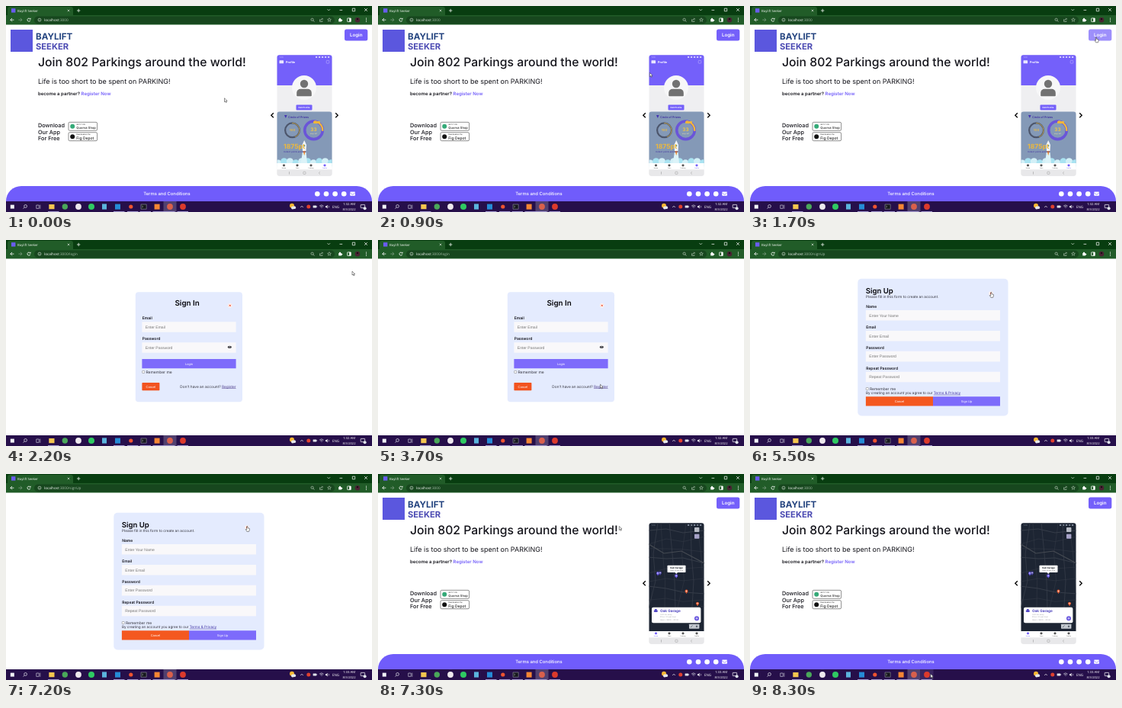
An HTML page with a canvas for the animation above (8400 ms loop, 480x270 px).

```html
<!DOCTYPE html>
<html lang="en">
<head>
<meta charset="utf-8">
<title>Baylift Seeker</title>
<style>
html, body { margin: 0; width: 100%; height: 100%; overflow: hidden; background: #fff; }
canvas { display: block; width: 480px; height: 270px; }
</style>
</head>
<body>
<canvas id="stage"></canvas>
<script>
const LOOP = 8400, STEP = 100;
const UI = 'Inter, sans-serif', CHROME = '"Open Sans", sans-serif', FIELD = '"Liberation Sans", Arial, sans-serif';
const PURPLE = '#7460fa', INK = '#15151c', ORANGE = '#f4581f';

const canvas = document.getElementById('stage');
const ratio = window.devicePixelRatio || 1;
canvas.width = 480 * ratio;
canvas.height = 270 * ratio;
const ctx = canvas.getContext('2d');
ctx.scale(ratio, ratio);
ctx.textRendering = 'geometricPrecision';

// ---------- drawing helpers ----------
function box(x, y, w, h, fill, r = 0, stroke = null, line = 0.6) {
  ctx.beginPath();
  ctx.roundRect(x, y, w, h, r);
  if (fill) { ctx.fillStyle = fill; ctx.fill(); }
  if (stroke) { ctx.strokeStyle = stroke; ctx.lineWidth = line; ctx.stroke(); }
}

function dot(x, y, r, fill) {
  ctx.beginPath();
  ctx.arc(x, y, r, 0, 7);
  ctx.fillStyle = fill;
  ctx.fill();
}

function arc(x, y, r, color, line, from = 0, to = Math.PI * 2) {
  ctx.beginPath();
  ctx.arc(x, y, r, from, to);
  ctx.strokeStyle = color;
  ctx.lineWidth = line;
  ctx.stroke();
}

function path(points, color, line = 0.8) {
  ctx.beginPath();
  points.forEach(([x, y]) => ctx.lineTo(x, y));
  ctx.strokeStyle = color;
  ctx.lineWidth = line;
  ctx.stroke();
}

function shape(points, fill) {
  ctx.beginPath();
  points.forEach(([x, y]) => ctx.lineTo(x, y));
  ctx.closePath();
  ctx.fillStyle = fill;
  ctx.fill();
}

// y is the middle of the capitals; returns the x where the text ends
function text(str, x, y, size, color = INK, { weight = 400, align = 'left', font = UI } = {}) {
  ctx.font = `${weight} ${size}px ${font}`;
  ctx.textAlign = align;
  ctx.fillStyle = color;
  ctx.fillText(str, x, y + size * 0.36);
  return x + ctx.measureText(str).width;
}

function link(str, x, y, size, color) {
  const end = text(str, x, y, size, color);
  box(x, y + size * 0.48, end - x, 0.5, color);
}

function cross(x, y, r, color, line) {
  path([[x - r, y - r], [x + r, y + r]], color, line);
  path([[x - r, y + r], [x + r, y - r]], color, line);
}

const clamp = v => Math.min(1, Math.max(0, v));
const ease = v => v * v * (3 - 2 * v);

// ---------- browser window ----------
function browser(route) {
  box(0, 0, 480, 12, '#083d10');
  box(2, 1, 86, 14, '#215c28', 3);
  box(0, 12, 480, 12.6, '#215c28');
  box(7, 3.2, 5.4, 5.4, '#6a5cf0');
  text('Baylift Seeker', 15, 6, 4.3, '#f2f6f2', { font: CHROME });
  cross(82, 6, 1.3, '#e8efe8', 0.6);
  path([[93, 6], [97.4, 6]], '#e8efe8', 0.8);
  path([[95.2, 3.8], [95.2, 8.2]], '#e8efe8', 0.8);

  path([[421.5, 4.2], [423.3, 6], [425.1, 4.2]], '#dfe8df', 0.7);
  path([[437.5, 5.4], [441.2, 5.4]], '#fff', 0.7);
  box(454.3, 3.2, 3.4, 3.6, null, 0, '#fff', 0.7);
  cross(472, 5, 1.9, '#fff', 0.7);

  box(37, 13.5, 394, 10, '#17471e', 5);
  path([[8, 16], [5.8, 18.2], [8, 20.4]], '#fff', 0.8);
  path([[5.8, 18.2], [10.4, 18.2]], '#fff', 0.8);
  path([[18.8, 16], [21, 18.2], [18.8, 20.4]], '#7e9d82', 0.8);
  path([[16.4, 18.2], [21, 18.2]], '#7e9d82', 0.8);
  arc(30, 18.2, 2, '#fff', 0.8, 0.3, 5.6);
  shape([[30.4, 17.5], [32.5, 17.5], [32.5, 15.4]], '#fff');
  arc(44, 18.2, 2, '#dce6dc', 0.6);
  path([[44, 17.8], [44, 19.4]], '#dce6dc', 0.6);
  const end = text('localhost', 50, 18.2, 4.7, '#fff', { font: CHROME });
  text(':3000' + route, end, 18.2, 4.7, '#a9bfac', { font: CHROME });

  const pale = '#cfdccf';
  arc(401.6, 17.8, 1.6, pale, 0.6);
  path([[402.8, 19], [404.4, 20.6]], pale, 0.7);
  path([[411.6, 17.4], [411.6, 20.4], [415, 20.4], [415, 19.4]], pale, 0.6);
  path([[412.6, 19], [413.6, 17.2], [415.6, 17.2], [414.4, 15.8]], pale, 0.6);
  star(424, 18.2, 2.5, pale);
  box(436.2, 17, 3.8, 3.6, '#fff', 0.5);
  dot(438, 16.7, 1, '#fff');
  dot(440.3, 18.7, 1, '#fff');
  box(447.7, 16, 4.6, 4.6, null, 0.4, '#fff', 0.8);
  box(450.2, 16, 2, 4.6, '#fff');
  dot(461, 18.2, 3.2, '#4a2333');
  dot(461, 17.2, 1.1, '#150d12');
  [16.1, 18.2, 20.3].forEach(y => dot(472.5, y, 0.6, '#fff'));
}

function star(x, y, r, color) {
  const points = Array.from({ length: 11 }, (_, i) => {
    const a = i * Math.PI / 5 - Math.PI / 2, d = i % 2 ? r * 0.45 : r;
    return [x + d * Math.cos(a), y + d * Math.sin(a)];
  });
  path(points, color, 0.5);
}

// ---------- taskbar ----------
function taskbar(minute, hoverLast) {
  box(0, 256, 480, 14, '#260f4a');
  box(206.5, 256, 17, 14, '#51406f');
  if (hoverLast) box(223.5, 256, 17, 14, '#3a2560');

  box(5.8, 260.6, 5, 5, '#f2f4f8');
  arc(25.6, 262.4, 1.9, '#e8ebf2', 0.7);
  path([[24.2, 263.9], [22.6, 265.6]], '#e8ebf2', 0.7);
  box(39.8, 261, 3.4, 4.4, null, 0, '#dde1ea', 0.6);
  path([[44.8, 260.6], [44.8, 265.8]], '#dde1ea', 0.6);

  box(56.3, 260, 7.2, 6.2, '#f4c64f');
  dot(77.3, 263, 3.7, '#4aa85a');
  dot(95, 263, 3.9, '#eee9ee');
  dot(112, 263, 4, '#2fca62');
  box(126, 259.4, 6, 7.2, '#5bb4dd');
  box(143, 259.6, 7, 7, '#258bd6');
  dot(163.8, 263, 2.6, '#ef5430');
  box(177, 260, 7.2, 6.2, '#16181e', 0, '#a9adb5', 0.5);
  path([[178.4, 262], [179.6, 263], [178.4, 264]], '#fff', 0.5);
  box(194.6, 259.6, 7, 7, '#f58634');
  dot(215, 263, 3.9, '#d9604c');
  dot(232, 263, 3.9, '#dc3a2c');
  [55, 141, 159, 175.5, 192.5, 207, 224.5].forEach(x => box(x, 269, 14.5, 1, '#a39ad0'));

  dot(375, 261.8, 3, '#f7b733');
  dot(376, 264.5, 2, '#e6e9ef');
  dot(378.2, 264.2, 1.9, '#e6e9ef');
  path([[386.2, 264], [388, 262.2], [389.8, 264]], '#fff', 0.7);
  dot(396.8, 263, 2.5, '#e0402f');
  box(402.6, 261.6, 4.6, 2.8, '#dfe3ea', 0.3);
  box(407.4, 262.3, 0.7, 1.4, '#dfe3ea');
  [1, 2.5, 4].forEach(r => arc(413.8, 265, r, '#e8ebf2', 0.6, -2.35, -0.8));
  shape([[419, 262.2], [420.2, 262.2], [421.6, 260.8], [421.6, 265.4], [420.2, 264], [419, 264]], '#fff');
  arc(421.8, 263.1, 1.8, '#fff', 0.5, -0.9, 0.9);
  const sys = { font: CHROME, align: 'center' };
  text('ENG', 432.5, 263, 4.5, '#fff', sys);
  text(`1:${minute} AM`, 450, 259.8, 4.3, '#fff', sys);
  text('8/3/2022', 450, 266.3, 4.1, '#fff', sys);
  box(465.2, 260.4, 5.4, 4.2, null, 0.3, '#fff', 0.7);
  dot(470.6, 265.2, 2, '#dfe3ea');
}

// ---------- phone carousel ----------
function phone(slide) {
  box(355.5, 64.3, 72, 158.4, '#efeff1', 3);
  ctx.save();
  ctx.beginPath();
  ctx.roundRect(355.5, 64.3, 72, 158.4, 3);
  ctx.clip();
  slide();
  box(355, 206, 73, 8.5, '#fff');
  [364.5, 382, 400, 418].forEach((x, i) => {
    const on = (slide === mapSlide ? 0 : 3) === i;
    box(x - 1.4, 207.5, 2.8, 2.7, on ? PURPLE : '#555', 0.8);
    text(['Home', 'Scan', 'Parking', 'Profile'][i], x, 212.6, 1.9, on ? PURPLE : '#555', { align: 'center' });
  });
  box(355, 214.5, 73, 9, '#e8e8ea');
  path([[371.5, 217.2], [371.5, 220.6]], '#999', 0.6);
  box(389.8, 217.2, 3.2, 3.2, null, 0.8, '#999', 0.5);
  path([[412, 217.2], [410.2, 218.9], [412, 220.6]], '#999', 0.5);
  ctx.restore();
  path([[350.8, 140.2], [347.8, 143.2], [350.8, 146.2]], '#000', 1.3);
  path([[432.2, 140.2], [435.2, 143.2], [432.2, 146.2]], '#000', 1.3);
}

function statusIcons(color) {
  text('1:20', 358.5, 67, 2.6, color);
  [406, 410, 414, 418, 422].forEach(x => box(x, 66, 2.2, 2, color));
}

function profileSlide() {
  box(355, 64, 73, 40, PURPLE);
  statusIcons('#cfc8ff');
  box(358.5, 71.3, 5.6, 4, '#e9e6ff', 0.6);
  text('Profile', 367, 73.3, 3.8, '#fff', { weight: 700 });
  box(420.2, 71.4, 3.6, 3.8, null, 0.8, '#b9aeff', 0.6);

  dot(391, 107, 16, '#f7f7f8');
  dot(391, 102, 5.2, '#727272');
  box(381.2, 108.8, 19.6, 9.4, '#727272', [5, 5, 1, 1]);
  box(380.5, 129.6, 21, 6.8, PURPLE, 1);
  text('Edit Profile', 391, 133, 2.9, '#fff', { weight: 600, align: 'center' });

  box(355, 138.5, 73, 67.5, '#8499b7', [4, 4, 0, 0]);
  shape([[365, 143], [368.6, 143], [366.8, 147]], '#4433b0');
  text('Circle of Prizes', 370, 145.2, 3.7, '#4030a0', { weight: 600 });
  arc(375.5, 162.8, 9.4, '#4d566c', 2.2);
  arc(375.5, 162.8, 9.4, '#d8b04a', 0.8, -1.6, 1.2);
  text('100', 375.5, 162.5, 4.2, '#e5b94b', { weight: 700, align: 'center' });
  arc(403.5, 162.8, 11.8, '#6a55d8', 3.6);
  arc(403.5, 162.8, 11.8, '#edb83b', 2.2, -1.5, 0.1);
  text('33', 403.5, 161.8, 6.4, '#f3c445', { weight: 700, align: 'center' });
  text('days left', 403.5, 167, 2.2, '#f4e3b0', { align: 'center' });
  box(403, 151, 9, 3, '#f0b63a', 1);

  for (let i = 0; i < 10; i++) {
    dot(357 + i * 7.7, 206 - 2.5 * Math.abs(Math.sin(i * 2.1)), 4.6, i % 2 ? '#a9e3f1' : '#d3f0f7');
  }
  shape([[388.8, 192], [393.6, 192], [395, 206], [386.8, 206]], '#dcf3f8');
  shape([[391.2, 176], [394, 182], [393.5, 190], [389, 190], [388.4, 182]], '#f1f4f7');
  shape([[389.4, 190], [393, 190], [391.2, 196]], '#ee8f36');
  dot(391.2, 183, 1.2, '#388cae');
  text('1875pt', 364, 184, 8.6, '#edb83b', { weight: 700 });
  text('Collect points and win', 364, 191, 2.8, '#4030a0');
}

function pin(x, y, color) {
  shape([[x - 1.8, y], [x + 1.8, y], [x, y + 3.6]], color);
  dot(x, y, 1.9, color);
  dot(x, y, 0.7, '#fff');
}

function mapSlide() {
  box(355, 64, 73, 142, '#1d2533');
  statusIcons('#7b8595');
  const road = '#363d49';
  for (let i = 0; i < 9; i++) {
    const y = 74 + i * 13, tilt = 5 * Math.sin(i * 1.8);
    path([[355, y + tilt], [378, y - 2], [400, y + 3 * Math.cos(i)], [428, y - tilt]], road, i % 3 ? 0.5 : 1);
  }
  for (let i = 0; i < 6; i++) {
    const x = 361 + i * 12.5, tilt = 6 * Math.cos(i * 2);
    path([[x + tilt, 64], [x, 105], [x + 3, 140], [x - tilt, 176]], road, i % 2 ? 0.5 : 0.8);
  }
  path([[355, 92], [375, 104], [398, 101], [428, 117]], '#454a52', 1.2);
  box(415, 70, 6.4, 6, '#b7bbc4', 0.8);
  box(415, 78.8, 6.4, 6, '#a7a3c8', 0.8);

  box(379.5, 119.8, 24, 9.2, '#fff', 0.8);
  shape([[389.5, 129], [393, 129], [391.2, 131]], '#fff');
  text('Oak Garage', 391.5, 122.8, 3, '#20242c', { weight: 700, align: 'center' });
  text('Open all day long', 391.5, 126.5, 2.1, '#777', { align: 'center' });
  pin(391.2, 133.2, '#6c5af0');
  pin(367, 130, '#6c5af0');
  pin(370, 129.5, '#4c46a2');
  pin(404.5, 153.5, '#ee6035');
  pin(419, 169.6, '#ee6035');

  box(359, 174.8, 64.4, 20.5, '#fff', 2);
  box(361.8, 178.4, 5, 2.5, '#5449c6', 0.8);
  box(362.8, 177, 3, 2, '#5449c6', 0.8);
  text('Oak Garage', 370, 179.5, 4.7, '#4a40bd', { weight: 700 });
  ['0.52 km away', 'Price: 2.0 per hour', 'Hours: 08:00 - 22:00'].forEach((s, i) =>
    text(s, 370, 184 + i * 3.4, 2.4, '#a3a3aa'));
  dot(418, 189.2, 3, '#6553de');
  path([[416.3, 189.2], [419.7, 189.2]], '#fff', 0.6);
  path([[418, 187.5], [418, 190.9]], '#fff', 0.6);
  box(408, 196.7, 13.4, 6, '#c3c8cf', 0.6);
  path([[410, 201], [412.6, 198.4]], '#59616d', 0.8);
  dot(418, 199.7, 1.2, '#59616d');
}

// ---------- pages ----------
function badge(y, color, small, name, size) {
  box(82, y, 37.6, 11, '#fff', 1.6, '#444', 0.6);
  dot(87.2, y + 5.5, 3, color);
  text(small, 92.3, y + 2.9, 2.3, '#222');
  text(name, 92.3, y + 7.1, size, '#222', { weight: 500 });
}

function homePage(hover, slide) {
  box(6, 31, 29, 29, '#5b57de');
  text('BAYLIFT', 39, 40.2, 11.6, '#23437f', { weight: 700 });
  text('SEEKER', 39, 53, 11.2, '#4a49b2', { weight: 700 });

  ctx.globalAlpha = 1 - 0.3 * hover;
  box(444, 30.6, 30.3, 15, PURPLE, 2.5);
  ctx.globalAlpha = 1;
  text('Login', 459.2, 38.2, 6.2, '#fff', { weight: 600, align: 'center' });

  text('Join 802 Parkings around the world!', 42, 73.2, 15.75, INK, { weight: 500 });
  text('Life is too short to be spent on PARKING!', 42, 98.3, 9, INK);
  const end = text('become a partner? ', 42, 115, 6.05, INK, { weight: 600 });
  text('Register Now', end, 115, 6.05, PURPLE, { weight: 600 });
  ['Download', 'Our App', 'For Free'].forEach((s, i) =>
    text(s, 42, 156.6 + i * 8.4, 7.3, INK, { weight: 500 }));
  badge(152.3, '#35aa78', 'GET IT ON', 'Quorva Shop', 4.1);
  badge(165.7, '#111', 'Download on the', 'Fig Depot', 5);
  phone(slide);

  box(0, 236, 480, 20, '#705cfb', [20, 20, 0, 0]);
  text('Terms and Conditions', 211, 246.2, 5.9, '#fff', { weight: 500, align: 'center' });
  [408.3, 420, 431.6, 443.2].forEach(x => dot(x, 246.2, 3.3, '#fff'));
  box(451.2, 243.6, 6.8, 5.2, '#fff', 0.8);
  path([[451.2, 244.9], [454.6, 247.2], [458, 244.9]], '#705cfb', 0.6);
}

function field(x, y, w, label, hint, h = 13.6) {
  text(label, x + 0.3, y - 4.9, 5, INK, { weight: 600 });
  box(x, y, w, h, '#f9f8fa');
  text(hint, x + 4.4, y + 6.8, 5.05, '#777', { font: FIELD });
}

function button(x, y, w, h, color, label, r = 0) {
  box(x, y, w, h, color, r);
  text(label, x + w / 2, y + h / 2, 4.05, '#fff', { weight: 500, align: 'center', font: FIELD });
}

function closeBadge(x, y) {
  dot(x, y, 2.8, '#fff0ec');
  cross(x, y, 1, '#ec4a2b', 1);
}

function remember(x, y) {
  box(x + 0.3, y - 1.7, 3.1, 3.1, '#fff', 0.4, '#777', 0.5);
  text('Remember me', x + 5, y, 5, '#33333d');
}

function signInPage() {
  box(169.8, 68.3, 140.2, 144, '#e4ebfe', 4);
  text('Sign In', 221.5, 82.4, 9.8, '#08080c', { weight: 600 });
  closeBadge(293.7, 85.8);
  field(178.4, 107.2, 123.2, 'Email', 'Enter Email');
  field(178.4, 134.2, 123.2, 'Password', 'Enter Password');
  ctx.beginPath();
  ctx.ellipse(293.3, 140.3, 2.6, 1.6, 0, 0, 7);
  ctx.fillStyle = '#26262c';
  ctx.fill();
  arc(293.3, 140.3, 0.9, '#fff', 0.4);
  button(178.4, 156, 123.2, 12.3, '#7d6bfb', 'Login');
  remember(178.4, 173.1);
  button(178.4, 187, 23, 10.3, '#f2541f', 'Cancel', 0.8);
  const end = text("Don't have an account? ", 228.3, 192.1, 4.8, '#33333d');
  link('Register', end, 192.1, 4.8, '#51418f');
}

function signUpPage() {
  box(141.3, 50.8, 197.2, 179.6, '#e4ebfe', 5);
  text('Sign Up', 151.7, 66.8, 9.6, '#08080c', { weight: 600 });
  text('Please fill in this form to create an account.', 152, 74.3, 4.7, '#33333d');
  closeBadge(316, 70);
  [['Name', 'Enter Your Name'], ['Email', 'Enter Email'], ['Password', 'Enter Password'],
    ['Repeat Password', 'Repeat Password']].forEach(([label, hint], i) =>
    field(151.9, 92 + i * 26.9, 176.1, label, hint));
  remember(151.9, 195.2);
  const end = text('By creating an account you agree to our ', 151.9, 200.6, 4.63, '#33333d');
  link('Terms & Privacy', end, 200.6, 4.63, '#4033a5');
  button(151.9, 205.3, 88.1, 12.2, ORANGE, 'Cancel');
  button(240, 205.3, 88, 12.2, '#7d6bfb', 'Sign Up');
}

// ---------- pointer ----------
const moves = [
  { from: 500, to: 1400, x: 454, y: 41 },
  { from: 2700, to: 3600, x: 291.5, y: 189.2 },
  { from: 3700, to: 3900, x: 291.7, y: 191.8 },
  { from: 4500, to: 5300, x: 316.3, y: 68.5 },
  { from: 7300, to: 8000, x: 233, y: 260 },
  { from: 8000, to: 8300, x: 236.8, y: 262 }
];

function pointerAt(t) {
  let x = 286.5, y = 120.8;
  for (const m of moves) {
    const k = ease(clamp((t - m.from) / (m.to - m.from)));
    x += (m.x - x) * k;
    y += (m.y - y) * k;
  }
  return { x, y };
}

function outlined(points) {
  ctx.beginPath();
  points.forEach(([x, y]) => ctx.lineTo(x, y));
  ctx.closePath();
  ctx.lineJoin = 'round';
  ctx.fillStyle = '#fff';
  ctx.strokeStyle = '#333';
  ctx.lineWidth = 0.55;
  ctx.fill();
  ctx.stroke();
  ctx.lineJoin = 'miter';
}

function pointer({ x, y }, hand) {
  ctx.save();
  ctx.translate(x, y);
  outlined(hand
    ? [[-0.5, 0], [0.5, 0], [0.7, 2.3], [3, 2.9], [3.1, 4.7], [2.4, 6.8], [-0.4, 6.8], [-2, 4.1], [-1.5, 3.6], [-0.6, 4.5]]
    : [[0, 0], [0, 5], [1.2, 4], [2, 5.8], [2.9, 5.4], [2.1, 3.7], [3.7, 3.6]]);
  ctx.restore();
}

// ---------- timeline ----------
const within = (t, a, b) => t >= a && t < b;

function draw(ms) {
  const t = Math.floor((ms % LOOP) / STEP) * STEP;
  box(0, 0, 480, 270, '#fff');
  if (within(t, 2200, 4400)) {
    browser('/login');
    signInPage();
  } else if (within(t, 4400, 7300)) {
    browser('/signUp');
    signUpPage();
  } else {
    browser('');
    homePage(t < 2200 ? clamp((t - 1300) / 400) : 0, t < 2200 ? profileSlide : mapSlide);
  }
  if (within(t, 4100, 4800)) {
    box(0, 248.2, 46, 7.8, '#12401b', [0, 1.5, 0, 0]);
    text('localhost:3000/signUp', 1.8, 252.2, 4.1, '#fff', { font: CHROME });
  }
  taskbar(t < 4200 ? 32 : 33, t >= 8100);
  const hand = within(t, 1400, 2200) || within(t, 3800, 4400) || within(t, 5200, 7300);
  pointer(pointerAt(t), hand);
}

const start = performance.now();
function tick() {
  draw(performance.now() - start);
  requestAnimationFrame(tick);
}
tick();
</script>
</body>
</html>
```
